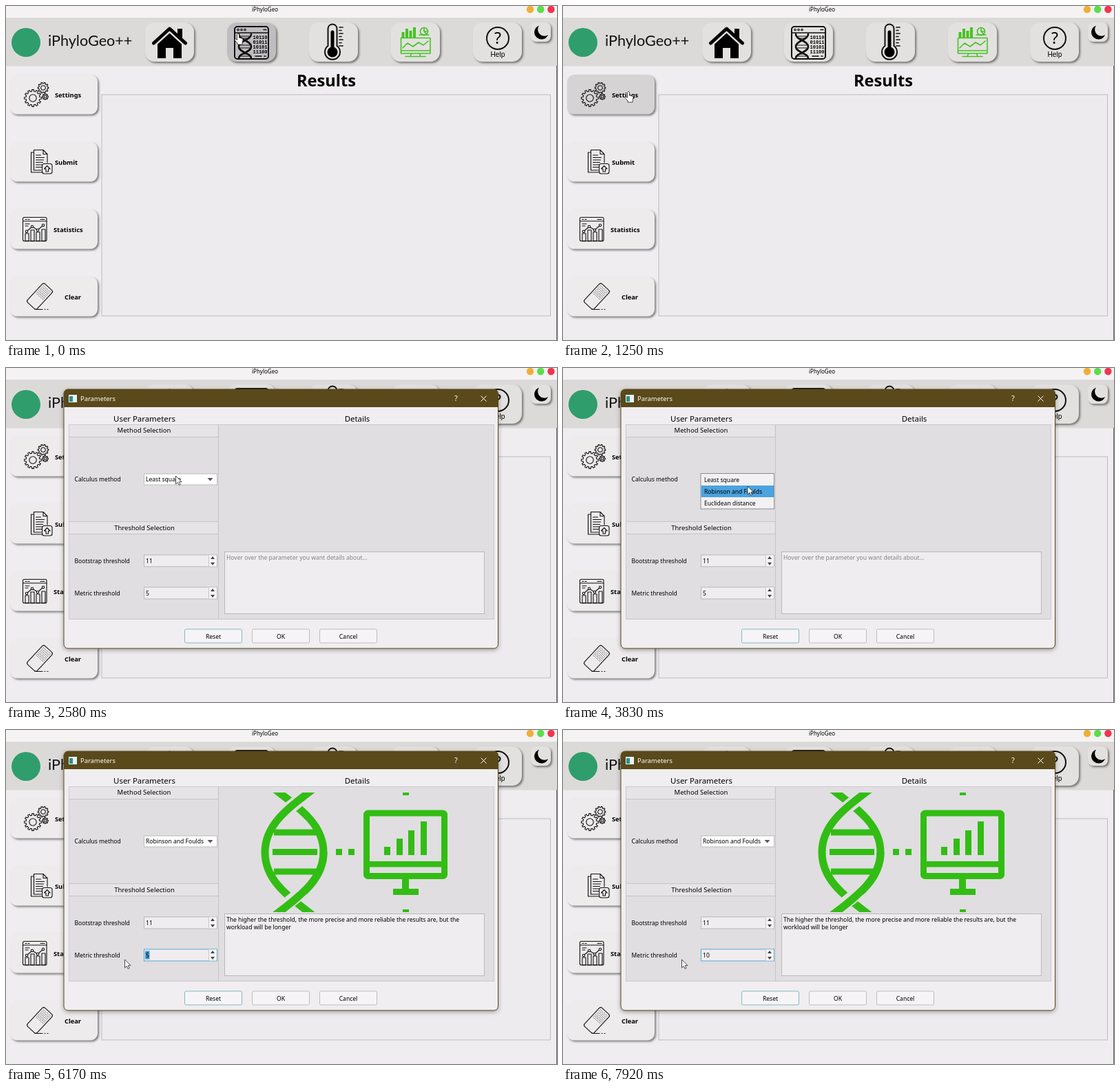
An HTML page that plays this animation: 800 by 486 pixels, repeating every 8 s.

```html
<!DOCTYPE html>
<html lang="en">
<head>
<meta charset="utf-8">
<title>iPhyloGeo</title>
<style>
  html, body { margin: 0; width: 100%; height: 100%; overflow: hidden; background: #efedef; }
  svg { display: block; width: 800px; height: 486px; font-family: "Noto Sans", "Open Sans", sans-serif; font-size: 8.55px; }
  .button { fill: #edebec; filter: drop-shadow(2px 2px 1.5px #0007); }
  .header .button { fill: #e3e1e0; }
  .header .button.hover { fill: #c0bdc0; }
  .side .button.hover { fill: #d6d3d5; }
  .line { fill: none; stroke: #111; stroke-width: 1.1; stroke-linejoin: round; stroke-linecap: round; }
  .thick { stroke-width: 2; }
  .green { stroke: #45c321; stroke-width: 1.6; }
  .bold { font-weight: 700; }
  .mid { text-anchor: middle; }
  .field { fill: #efedef; stroke: #b9b7b9; }
  .rule { fill: none; stroke: #c6c4c6; }
</style>
</head>
<body>
<svg id="stage" viewBox="0 0 800 486"></svg>
<script>
const FRAME_RATE = 12, LOOP = 8000;
const stage = document.getElementById('stage');

// Markup helpers
const rect = (x, y, w, h, attrs = '') => `<rect x="${x}" y="${y}" width="${w}" height="${h}" ${attrs}/>`;
const path = (d, attrs = 'class="line"') => `<path d="${d}" ${attrs}/>`;
const text = (x, y, str, attrs = '') => `<text x="${x}" y="${y}" ${attrs}>${str}</text>`;
const circle = (x, y, r, attrs = 'class="line"') => `<circle cx="${x}" cy="${y}" r="${r}" ${attrs}/>`;
const range = (n, fn) => Array.from({ length: n }, (_, i) => fn(i)).join('');

function gear(cx, cy, r, teeth) {
  const points = [];
  for (let i = 0; i < teeth; i++) {
    [[-.28, .8], [-.2, 1], [.2, 1], [.28, .8]].forEach(([offset, scale]) => {
      const a = (i + offset) * 2 * Math.PI / teeth;
      points.push(`${(cx + r * scale * Math.cos(a)).toFixed(1)} ${(cy + r * scale * Math.sin(a)).toFixed(1)}`);
    });
  }
  return path(`M${points.join('L')}Z`) + circle(cx, cy, r * .42);
}

function houseIcon() {
  return path('M220 55L237.500 39L255 55V76H243V61H232V76H220Z', '') + rect(249, 33, 7, 14) +
    path('M214.500 54L237.500 33L260.500 54', 'fill="none" stroke="#000" stroke-width="5" stroke-linecap="round" stroke-linejoin="round"') +
    path('M219 55.500L237.500 38.500L256 55.500', 'fill="none" stroke="#e3e1e0" stroke-width="1.5"');
}

function sequenceIcon() {
  const digits = ['10110', '01011', '10101', '11100'];
  return rect(332, 30, 49, 47, 'rx="4" class="line thick"') +
    path('M332 39H381M362 73H371M375 73H377M374 34.500H378', 'class="line" style="stroke-width:1.5"') +
    range(3, i => circle(337 + i * 5, 34.500, 1.3)) +
    path('M338 41C338 50 356 50 356 59S338 68 338 76M356 41C356 50 338 50 338 59S356 68 356 76', 'class="line" style="stroke-width:2.6"') +
    path('M341 44H353M343 47H351M340 57H354M340 61H354M343 70H351M341 73H353') +
    digits.map((row, i) => text(369, 47.500 + i * 7.200, row, 'class="mid bold" font-family="Liberation Mono, monospace" font-size="7"')).join('');
}

function thermometerIcon() {
  return path('M467.500 58V33a6.500 6.500 0 0 1 13 0V58a11 11 0 1 1 -13 0Z', 'class="line thick"') +
    path('M474 38V62', 'stroke="#000" stroke-width="5" stroke-linecap="round"') + circle(474, 67, 7.5, '') +
    range(7, i => path(`M484 ${31 + i * 4.5}h${i % 2 ? 3 : 5}`, 'class="line" style="stroke-width:1.7"'));
}

function chartIcon() {
  const bars = [[574.500, 8], [580, 13], [585.500, 10], [591, 15]];
  return bars.map(([x, h]) => rect(x, 46 - h, 4, h, 'fill="#45c321"')).join('') +
    path('M573.500 46.500H616V69H573.500ZM573.500 65H616M589 69L587 73M600 69L602 73M580 73.500H609M600 42H614', 'class="line green"') +
    path('M576 61L583 54L591 59L599 53L606 57L613 51', 'class="line green"') +
    circle(607, 37, 5.5, 'class="line green"') + path('M607 31.500V37L611 41M607 37H612', 'class="line green"');
}

function submitIcon() {
  return path('M40 213H36.500V242H53M40.500 209.500H54L60 215.500V228M40.500 209.500V239H51M54 209.500V215.500H60') +
    range(6, i => path(`M43.500 ${217 + i * 3.5}h${i ? 13 - i : 7}`)) +
    rect(52.500, 229.500, 14.500, 14.500, 'rx="3" class="line" style="fill:#edebec"') +
    path('M59.700 232.500L64 237H61.500V241H58V237H55.500Z');
}

function statisticsIcon() {
  const bars = [[28, 11], [36, 16], [44, 13], [52, 17]];
  return rect(24.500, 307.500, 34.500, 34.500, 'rx="2" class="line"') + path('M25 313H59M28 310.500H30M32 310.500H34M50 310.500H56M28 317H34M28 320H32') +
    bars.map(([x, h]) => rect(x, 342 - h, 5, h, 'class="line"')).join('') +
    path('M30 328L38 321L46 326L54 319') + [[30, 328], [38, 321], [46, 326], [54, 319]].map(p => circle(...p, 1.7, 'class="line" style="fill:#edebec"')).join('');
}

function eraserIcon() {
  const dots = range(49, i => circle(-6.600 + i % 7 * 2.200, -15 + Math.floor(i / 7) * 2.500, .45, ''));
  return `<g transform="translate(49 422.500) rotate(43)">${rect(-9.500, -18.500, 19, 37, 'rx="3" class="line"')}${dots}</g>` +
    path('M42 441.500H53M56 441.500H57M60 441.500H61');
}

const headerButton = (i, icon) => rect(202 + i * 119, 24, 71, 57, `rx="14" class="button" id="header${i}"`) + icon;
const sideButton = (i, x, label, icon) =>
  rect(6, 100 + i * 98, 127, 57.500, `rx="10" class="button" id="side${i}"`) + icon + text(x, 133 + i * 98, label, 'class="bold" font-size="9.3"');

function mainWindow() {
  const lights = ['#f0ae35', '#5ade49', '#f3344f'];
  return rect(0, 0, 800, 486, 'fill="#efedef"') + rect(0, 0, 800, 17, 'fill="#f4f2f3"') + rect(0, 17, 800, 70.500, 'fill="#dcdad8"') +
    rect(799, 87, 1, 399, 'fill="#666"') +
    text(376, 8, 'iPhyloGeo', 'class="mid" font-size="8"') +
    lights.map((color, i) => circle(761 + i * 15.200, 5, 5.2, `fill="${color}"`)).join('') +
    circle(29, 53, 21, 'fill="#2f9d6c"') +
    text(61, 58, 'iPhyloGeo++', 'font-family="Lato, sans-serif" font-size="21.600" fill="#111"') +
    `<g class="header">` + headerButton(0, houseIcon()) + headerButton(1, sequenceIcon()) + headerButton(2, thermometerIcon()) +
    headerButton(3, chartIcon()) +
    headerButton(4, circle(714, 47, 16, 'class="line thick"') +
      text(714, 55, '?', 'class="mid" font-size="23"') +
      text(714, 73.500, 'Help', 'class="mid" font-family="Liberation Sans, sans-serif" font-size="10.200"')) +
    rect(762, 24, 29, 28, 'rx="8" class="button"') + path('M774 28.500A10.300 10.300 0 1 0 787 42A9.500 9.500 0 0 1 774 28.500Z', '') + '</g>' +
    `<g class="side">` +
    sideButton(0, 71, 'Settings', gear(39, 134, 12.500, 12) + gear(54, 119, 7.800, 10) + gear(57, 132, 4.300, 8)) +
    sideButton(1, 71, 'Submit', submitIcon()) + sideButton(2, 69, 'Statistics', statisticsIcon()) +
    sideButton(3, 85, 'Clear', eraserIcon()) + '</g>' +
    text(465, 117, 'Results', 'class="mid bold" font-size="23.600"') +
    rect(139, 129, 651.500, 322, 'fill="#edebee" stroke="#bdbbbd"');
}

function detailPicture() {
  const strand = d => path(d, 'fill="none" stroke="#32bd14" stroke-width="11"');
  const gap = d => path(d, 'stroke="#e0dee0" stroke-width="19" fill="none"');
  const bars = [[549, 170], [567, 158], [584, 146], [602, 133]];
  const left = 'M446 86C408 115 376 138 376 178S408 241 446 270';
  const right = 'M390 86C428 115 461 138 461 178S428 241 390 270';
  return `<g id="picture" fill="#32bd14"><clipPath id="crop">${rect(365, 91, 280, 174)}</clipPath><g clip-path="url(#crop)">` +
    strand(right) + gap('M432 97L402 121') + strand(left) + gap('M432 234L402 258') + strand('M461 178C461 216 428 241 390 270') +
    [149, 177.500, 206].map((y, i) => rect(i === 1 ? 387 : 389, y - 4.500, i === 1 ? 65 : 61, 9)).join('') +
    rect(479, 173, 9, 9) + rect(497, 173, 9, 9) + rect(576, 91, 9, 4) + rect(576, 261, 9, 4) +
    rect(523.500, 121, 113, 91.500, 'rx="2" fill="none" stroke="#32bd14" stroke-width="9"') + rect(520, 191, 120, 8.500) +
    bars.map(([x, y]) => rect(x, y, 9, 182 - y)).join('') + rect(575, 216, 10, 17) + rect(562, 231, 37, 9) + '</g></g>';
}

function spinBox(y, id, value) {
  return rect(200.500, y + .5, 106, 17, `class="field" id="${id}Box"`) + rect(294, y + 1, 12, 16, 'fill="#f7f5f7"') +
    path(`M297 ${y + 6.500}h6l-3-4zM297 ${y + 11.500}h6l-3 4z`, 'fill="#444"') + path(`M294.500 ${y + 1}v16`, 'class="rule"') +
    rect(202, y + 3, 6.500, 12, `id="${id}Selection" fill="#4597d3" visibility="hidden"`) + text(203, y + 12, value, `id="${id}Value"`);
}

function dialog() {
  const button = (x, label, color) => rect(x + .5, 380, 83, 20, `rx="2" fill="#f6f4f6" stroke="${color}"`) + text(x + 42, 393.500, label, 'class="mid"');
  const options = ['Least square', 'Robinson and Foulds', 'Euclidean distance'];
  return `<g id="dialog">` +
    rect(84, 31, 630.500, 377, 'rx="6" fill="#f0eef0" stroke="#5a491a" style="filter:drop-shadow(0 2px 3px #0005)"') +
    path('M84 57V37a6 6 0 0 1 6-6H708.500a6 6 0 0 1 6 6V57Z', 'fill="#5a491a"') +
    rect(91, 39, 12, 11, 'fill="#e8f3f2"') + rect(92, 41, 5, 8, 'fill="#2e8f8b"') +
    text(108, 48, 'Parameters', 'fill="#fff" font-size="9.400"') + text(653.500, 48, '?', 'class="mid" fill="#fff" font-size="11"') +
    path('M689.500 40.500L697.500 48.500M697.500 40.500L689.500 48.500', 'stroke="#fff"') +
    text(201, 78, 'User Parameters', 'class="mid" font-size="11.400"') + text(510, 78, 'Details', 'class="mid" font-size="11.400"') +
    rect(91.500, 82.500, 617, 283, 'fill="#e0dee0" stroke="#cbc9cb"') +
    rect(92, 83, 215, 17, 'fill="#e6e4e6"') + rect(92, 224, 215, 17, 'fill="#e6e4e6"') +
    path('M91 100.500H308M91 223.500H308M91 241.500H308M308.500 82V366', 'class="rule"') +
    text(200.500, 94, 'Method Selection', 'class="mid" font-size="9.500"') + text(201, 236, 'Threshold Selection', 'class="mid" font-size="9.500"') +
    text(99.500, 165, 'Calculus method') + text(99.500, 284, 'Bootstrap threshold') + text(99.500, 331, 'Metric threshold') +
    rect(200.500, 154, 106, 16, 'fill="#fff" stroke="#bebcbe"') + text(203, 165, '', 'id="method"') +
    path('M292.500 160h8l-4 4.500z', 'fill="#555"') + spinBox(271.500, 'bootstrap', '11') + spinBox(318.500, 'metric', '5') +
    detailPicture() + rect(317.500, 267.500, 377, 90, 'class="field"') +
    text(320, 279, 'Hover over the parameter you want details about...', 'id="hint" fill="#858385"') +
    `<g id="explanation">` + text(320, 279, 'The higher the threshold, the more precise and more reliable the results are, but the') +
    text(320, 290, 'workload will be longer') + '</g>' +
    button(259, 'Reset', '#82b9c3') + button(357, 'OK', '#bfbdbf') + button(455, 'Cancel', '#bfbdbf') +
    `<g id="menu">` + rect(200, 153.500, 106.500, 51.500, 'fill="#f3f1f3" stroke="#8d8b8d"') +
    rect(200.500, 171, 105.500, 17, 'id="highlight" fill="#4ba3df"') +
    options.map((option, i) => text(205, 166 + i * 17, option)).join('') + '</g></g>';
}

const pointers =
  path('M0 0V12L2.800 9.500L4.700 13.500L6.600 12.600L4.800 8.700H8.500Z', 'id="arrow" fill="#fff" stroke="#222" stroke-width=".8"') +
  path('M-1.500 1.500Q0 -1 1.500 1.500V6L6 7.200Q7.300 7.700 7 9.500L6 13.500V16H-1V14L-5 9.500Q-5 7.500 -3 8.200L-1.500 9.500Z',
    'id="hand" fill="#fff" stroke="#222" stroke-width=".8"');

stage.innerHTML = mainWindow() + dialog() + `<g id="pointer">${pointers}</g>`;

const get = id => document.getElementById(id);
const show = (id, visible) => get(id).setAttribute('visibility', visible ? 'visible' : 'hidden');

// Pointer stops: time, x, y
const stops = [
  [0, 337, 40], [120, 337, 40], [750, 95, 124], [1250, 95, 124], [1416, 105, 124], [1750, 105, 124],
  [2450, 246.500, 157], [3000, 246.500, 157], [3500, 268, 172], [4250, 268, 172],
  [5000, 250, 321], [5500, 250, 321], [5950, 172.500, 334], [LOOP, 172.500, 334]
];

function pointerAt(t) {
  const next = Math.max(1, stops.findIndex(stop => stop[0] > t));
  const [t0, x0, y0] = stops[next - 1], [t1, x1, y1] = stops[next];
  const u = (t - t0) / (t1 - t0), eased = u * u * (3 - 2 * u);
  return [x0 + (x1 - x0) * eased, y0 + (y1 - y0) * eased];
}

const inside = (x, y, left, top, w, h) => x >= left && x <= left + w && y >= top && y <= top + h;

function draw(now) {
  const t = Math.floor((now % LOOP + 5) * FRAME_RATE / 1000) * 1000 / FRAME_RATE % LOOP;
  const [x, y] = pointerAt(t);
  const open = t >= 1400;
  const overHeader = !open && inside(x, y, 321, 24, 71, 57);
  const overSettings = !open && inside(x, y, 6, 100, 127, 58);
  const overButton = overHeader || overSettings;
  const detailed = t >= 5910;
  const focused = t >= 5300;
  const menuOpen = t >= 2900 && t < 4150;

  get('header1').classList.toggle('hover', overHeader);
  get('side0').classList.toggle('hover', overSettings);
  get('pointer').setAttribute('transform', `translate(${x} ${y})`);
  show('hand', overButton);
  show('arrow', !overButton);

  get('dialog').style.display = open ? '' : 'none';
  get('menu').style.display = menuOpen ? '' : 'none';
  get('highlight').setAttribute('y', y > 168 ? 171 : 154);
  get('method').textContent = t < 4150 ? 'Least square' : 'Robinson and Foulds';
  get('picture').style.display = detailed ? '' : 'none';
  show('hint', !detailed);
  show('explanation', detailed);
  get('metricBox').style.stroke = focused ? '#5aa5d6' : '';
  show('metricSelection', focused && t < 6900);
  get('metricValue').textContent = t < 6900 ? '5' : t < 7150 ? '1' : '10';
}

function animate() {
  draw(performance.now());
  requestAnimationFrame(animate);
}
animate();
</script>
</body>
</html>
```
